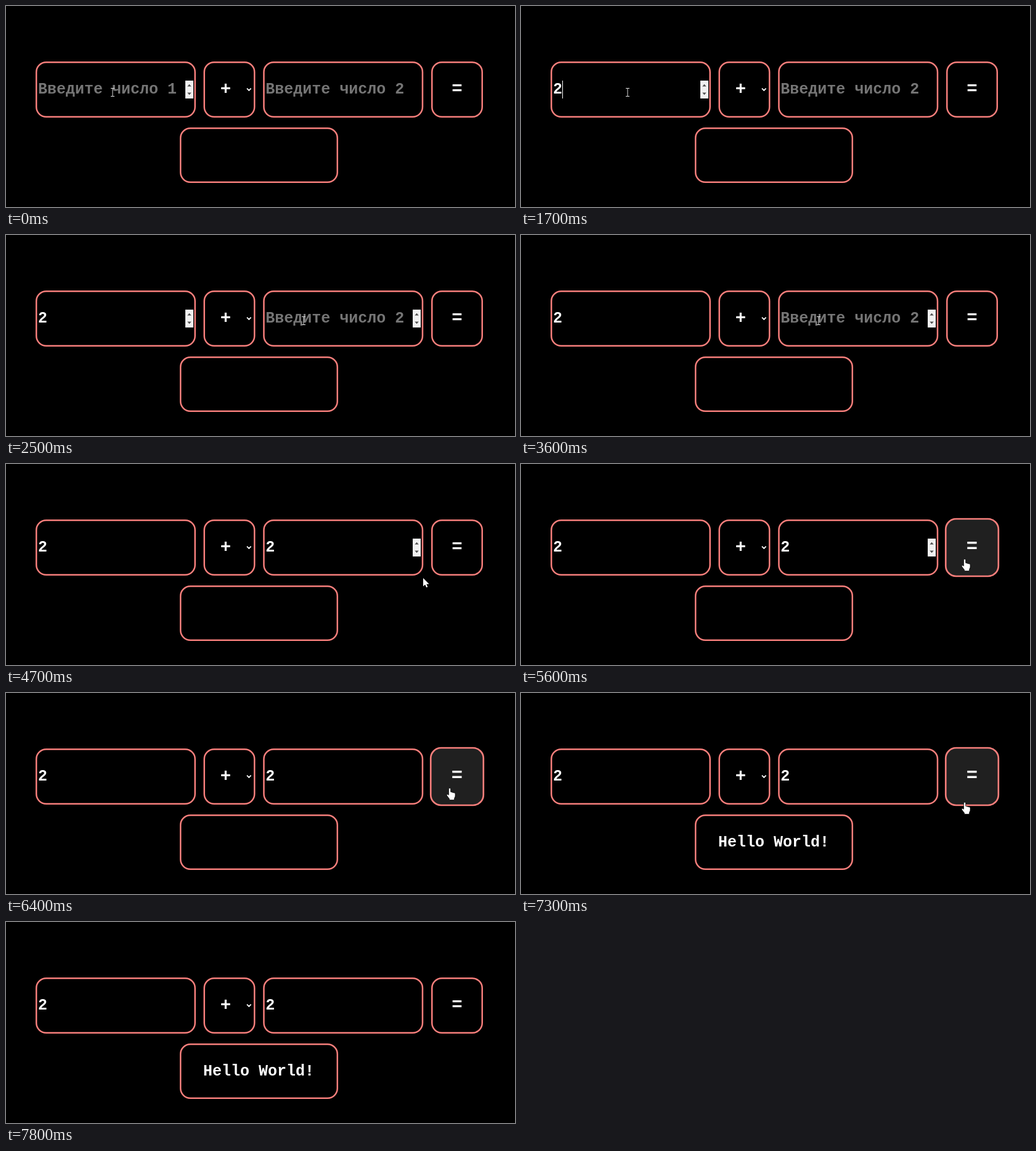
An HTML page for the animation above (8 s loop, 826 by 326 pixels).

```html
<!DOCTYPE html>
<html lang="ru">
<head>
<meta charset="utf-8">
<style>
  html, body { margin: 0; width: 100%; height: 100%; overflow: hidden; background: #000; }
  svg { display: block; width: 826px; height: 326px; cursor: default; }
  text { font: bold 25px "Courier New", "Liberation Mono", monospace; fill: #fff; }
  .hint { fill: #757575; }
  .sign { font-size: 29px; text-anchor: middle; }
  .box { stroke: #f87f7c; stroke-width: 2.5; }
</style>
</head>
<body>
<svg id="stage" viewBox="0 0 826 326"></svg>
<script>
const LOOP = 8000, STEP = 100, BLINK = 530;
const TOP = 90, HEIGHT = 91, FIELD = 260, BUTTON = 84;
const stage = document.getElementById('stage');
const clamp = v => Math.max(0, Math.min(1, v));

// Each field is focused, typed into and left; the button is hovered, then clicked.
const fields = [
  { x: 48, hint: 'Введите число 1', focus: 400, typed: 1700, blur: 3100 },
  { x: 417.2, hint: 'Введите число 2', focus: 3100, typed: 4000, blur: 6400 }
];
const enter = 4700, leave = 7300, answer = 6500;

// Resting points of the pointer: time, x, y
const path = [
  [0, 173, 140], [1900, 173, 140], [2500, 483, 139], [4400, 483, 139],
  [4700, 677, 185], [5200, 720, 154], [7100, 720, 154], [7300, 720, 177], [LOOP, 622, 420]
];

function pointerAt(t) {
  const i = path.findIndex(k => k[0] > t);
  const [t0, x0, y0] = path[i - 1], [t1, x1, y1] = path[i];
  const p = (t - t0) / (t1 - t0);
  return [x0 + (x1 - x0) * p, y0 + (y1 - y0) * p];
}

const label = (x, y, s, cls = '') => `<text x="${x}" y="${y}" class="${cls}">${s}</text>`;
const box = (x, y, w, h, fill = 'none') =>
  `<rect class="box" x="${x + 1.25}" y="${y + 1.25}" width="${w - 2.5}" height="${h - 2.5}" rx="16" fill="${fill}"/>`;

const spinner = x => `<g transform="translate(${x} 121)">
  <path d="M0 0h13v29H0z" fill="#f1f1f1"/>
  <path d="M3.3 9.5h6.4L6.5 5.8zM3.3 19.5h6.4l-3.2 3.7z" fill="#505050"/></g>`;

function field({ x, hint, focus, typed, blur }, t, hovered) {
  const filled = t >= typed, focused = t >= focus && t < blur;
  const since = t - (filled ? typed : focus) + 40;
  const caret = focused && Math.floor(since / BLINK) % 2 === 0;
  return box(x, TOP, FIELD, HEIGHT)
    + (filled ? label(x + 4, 142, '2') : label(x + 4, 142, hint, 'hint'))
    + (caret ? `<rect x="${Math.round(x + (filled ? 19 : 4))}" y="121" width="1" height="29" fill="#fff"/>` : '')
    + (focused || hovered && t < blur ? spinner(Math.round(x + 243)) : '');
}

const shapes = {
  beam: '<path d="M-3-6.5H3M0-6.5v13M-3 6.5H3" fill="none" stroke="#ddd"/>',
  arrow: '<path d="M0 0V13.5L3.1 10.6 5.2 15.2 7.3 14.2 5.3 9.8H9.6Z" fill="#fff"/>',
  hand: `<path d="M-1.6 1.4Q0-1.4 1.6 1.4V6.3L7 7.9Q9 7.5 9 9.4V13.5L7.4 17.5V19.5H-.4V17.8L-4.8 12
    Q-5-.5 10-1.6 11.4Z" fill="#fff" stroke="#000" stroke-width=".7"/>`.replace('Q-5-.5 10-1.6 11.4', 'Q-5 9-1.6 11.4')
};
shapes.hand = `<path d="M-1.6 1.4Q0-1.4 1.6 1.4V6.3L7 7.9Q9 7.5 9 9.4V13.5L7.4 17.5V19.5H-.4V17.8L-4.8 12Q-5 9-1.6 11.4Z"
  fill="#fff" stroke="#000" stroke-width=".7"/>`;

function draw(t) {
  const [mx, my] = pointerAt(t);
  const over = (x, w) => my > TOP && my < TOP + HEIGHT && mx > x && mx < x + w;
  const hovered = fields.map(f => over(f.x, FIELD));
  const shape = hovered.includes(true) ? 'beam' : over(690, BUTTON) ? 'hand' : 'arrow';
  const lift = clamp((t - enter) / 300) - clamp((t - leave) / 300);
  const grey = Math.round(32 * lift);

  stage.innerHTML =
    fields.map((f, i) => field(f, t, hovered[i])).join('')
    + box(320.5, TOP, BUTTON, HEIGHT) + label(356.5, 143, '+', 'sign')
    + '<path d="M391 133.7l3.3 3.3 3.3-3.3" fill="none" stroke="#fff" stroke-width="1.8"/>'
    + `<g transform="translate(732 135.5) scale(${1 + .05 * lift}) translate(-732 -135.5)">`
    + box(690, TOP, BUTTON, HEIGHT, `rgb(${grey},${grey},${grey})`) + label(732, 143, '=', 'sign') + '</g>'
    + box(282, 197, 257, 90) + (t >= answer ? label(320, 249, 'Hello World!') : '')
    + `<g transform="translate(${mx} ${my})">${shapes[shape]}</g>`;
}

let last = -1;
function tick() {
  const t = Math.floor(performance.now() % LOOP / STEP) * STEP;
  if (t !== last) draw(last = t);
  requestAnimationFrame(tick);
}
tick();
</script>
</body>
</html>
```
